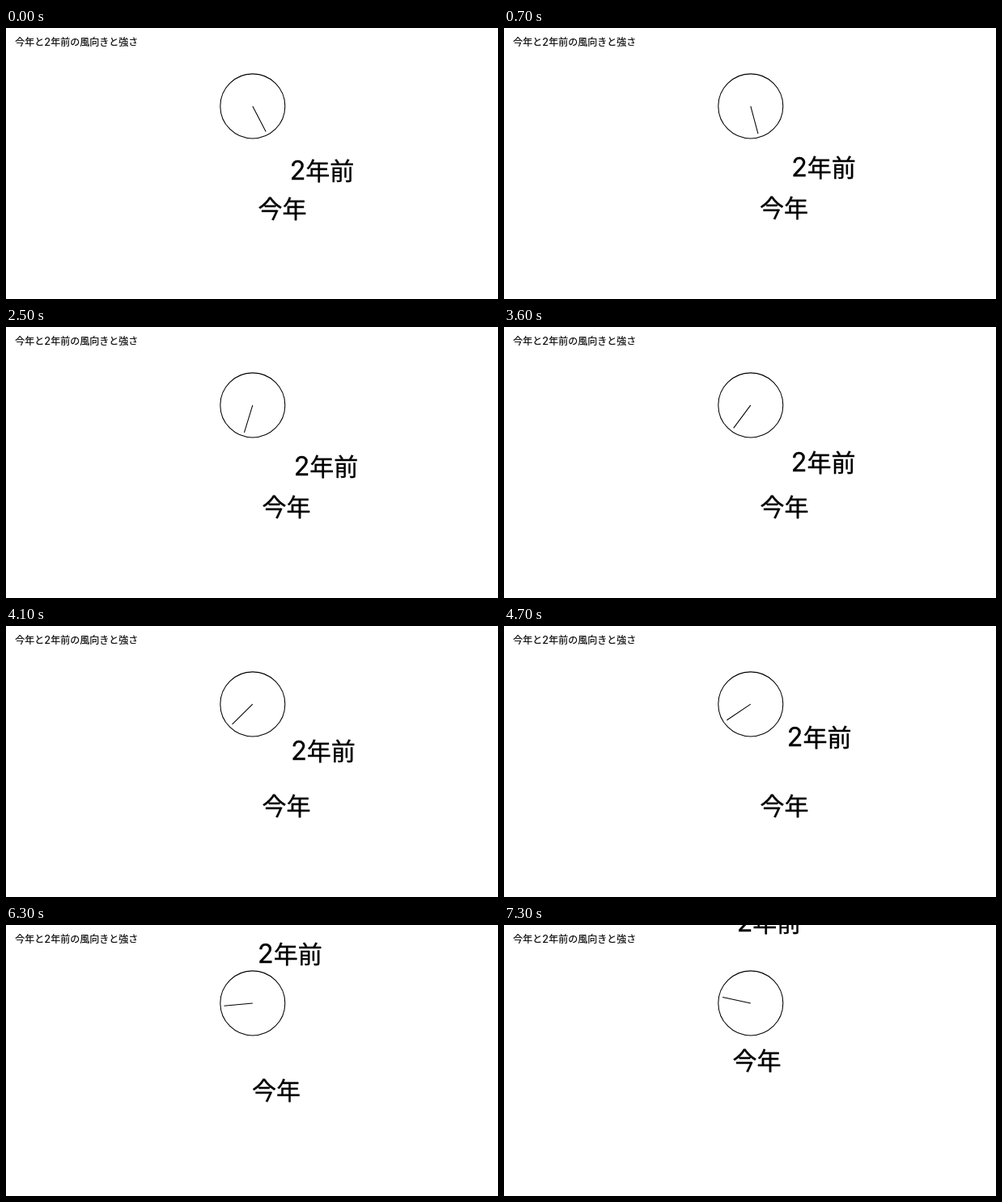
Write an HTML page with a canvas that moves like this. It is 608 by 336 pixels and loops after 7.4 s.

```html
<!DOCTYPE html>
<html lang="ja">
<head>
<meta charset="utf-8">
<title>今年と2年前の風向きと強さ</title>
<style>
  html, body { margin: 0; width: 100%; height: 100%; overflow: hidden; background: #fff; }
  canvas { display: block; width: 608px; height: 336px; }
</style>
</head>
<body>
<canvas id="stage"></canvas>
<script>
const W = 608, H = 336;
const STEP = 100, STEPS = 74;
const CENTER = { x: 304.8, y: 96.9 }, RADIUS = 40, HAND = 35.5;

const canvas = document.getElementById('stage');
const ctx = canvas.getContext('2d');
const ratio = window.devicePixelRatio || 1;
canvas.width = W * ratio;
canvas.height = H * ratio;

function ease(step, from, to) {
  const u = Math.min(1, Math.max(0, (step - from) / (to - from)));
  return u * u * (3 - 2 * u);
}

const settle = (step, time) => Math.exp(-step / time);

// The older wind drifts a little first, then is carried off upwards
function pastPlace(step) {
  const drift = ease(step, 32, 48);
  return {
    x: 355.7 - 5 * settle(step, 3) - 6 * drift - 62 * ease(step, 49, 73),
    y: 183.5 + 4 * settle(step, 5) - 29 * drift - 147 * ease(step, 43.5, 73)
  };
}

// The current wind rests longer and is still gaining speed at the end
function presentPlace(step) {
  const drift = ease(step, 48, 57), rise = ease(step, 58, 80);
  return {
    x: 316.4 - 5 * settle(step, 3) - 8 * drift - 34 * rise,
    y: 234 + 0.6 * settle(step, 8) - 10.5 * drift - 59 * rise
  };
}

// A hairline outline gives the text its slightly heavier weight
function ink(text, x, y, size) {
  ctx.lineWidth = size * 0.012;
  ctx.strokeText(text, x, y);
  ctx.fillText(text, x, y);
}

// Digits are wider and taller than those of the Japanese font
function write(text, x, y, size) {
  for (const part of text.split(/(\d)/)) {
    const digit = /\d/.test(part);
    ctx.font = digit
      ? `${size * 1.07}px Inter, sans-serif`
      : `${size}px "Noto Sans CJK JP", "Noto Sans CJK", sans-serif`;
    ink(part, x, y, size);
    x += size * (digit ? 0.655 : part.length);
  }
}

function drawDial(step) {
  const angle = (27.4 - 1.775 * step) * Math.PI / 180;
  ctx.lineWidth = 1.05;
  ctx.beginPath();
  ctx.arc(CENTER.x, CENTER.y, RADIUS, 0, Math.PI * 2);
  ctx.moveTo(CENTER.x, CENTER.y);
  ctx.lineTo(CENTER.x + HAND * Math.sin(angle), CENTER.y + HAND * Math.cos(angle));
  ctx.stroke();
}

function draw(now) {
  const step = Math.floor(now / STEP) % STEPS;
  const past = pastPlace(step), present = presentPlace(step);
  ctx.setTransform(ratio, 0, 0, ratio, 0, 0);
  ctx.fillStyle = '#fff';
  ctx.fillRect(0, 0, W, H);
  ctx.fillStyle = ctx.strokeStyle = '#000';
  write('今年と2年前の風向きと強さ', 11.3, 22, 12);
  drawDial(step);
  write('2年前', past.x, past.y, 30);
  write('今年', present.x, present.y, 30);
}

const start = performance.now();
function tick() {
  draw(performance.now() - start);
  requestAnimationFrame(tick);
}
tick();
</script>
</body>
</html>
```
